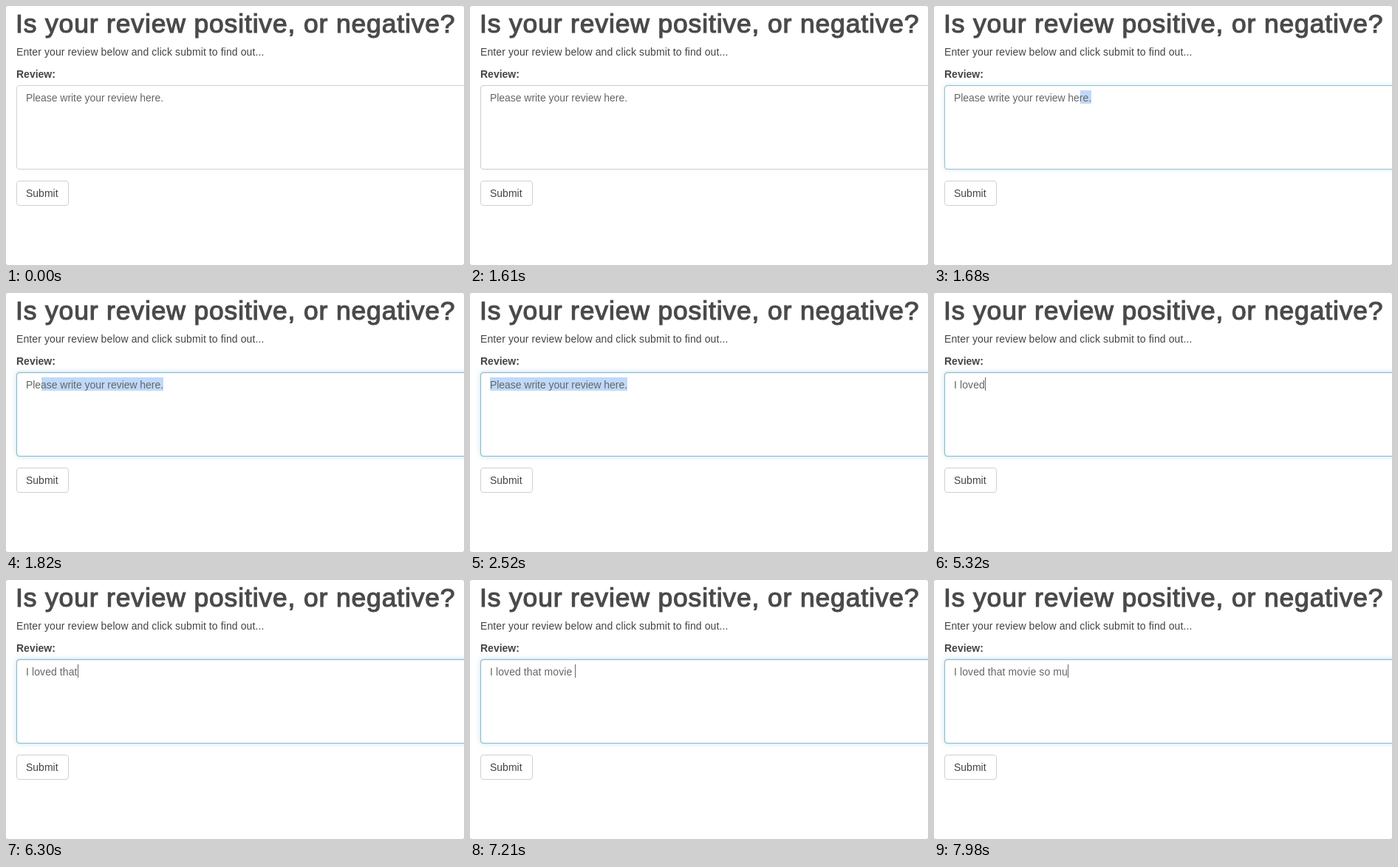
Write an HTML page that moves like this. It is 620x350 px and loops after 8000 ms.

```html
<!DOCTYPE html>
<html lang="en">
<head>
<meta charset="utf-8">
<title>Review form</title>
<style>
html, body { margin: 0; width: 100%; height: 100%; overflow: hidden; background: #a8a8a8; }
#stage {
  position: relative; width: 620px; height: 350px; overflow: hidden;
  background: #fff; border-radius: 2px;
  font: 14px/20px "Liberation Sans", Arial, sans-serif; color: #444;
}
#stage > * { position: absolute; box-sizing: border-box; margin: 0; white-space: pre; }
h1 {
  left: 13px; top: 4px; font-size: 35.5px; line-height: 40px; font-weight: 400;
  letter-spacing: .84px; color: #4a4a4a; -webkit-text-stroke: 1.2px #4a4a4a;
}
.intro { left: 14px; top: 52px; letter-spacing: .1px; }
.label { left: 14px; top: 82px; font-weight: 700; }
.box { left: 14px; top: 107px; width: 640px; height: 114px; border: 1px solid #d2d2d2; border-radius: 4px; }
#focus {
  border-color: #87b9d0;
  box-shadow: inset 0 1px 1px rgba(0, 0, 0, .05), 0 0 6px rgba(110, 185, 225, .45);
}
#mark { top: 114px; height: 18px; background: #bfd9f9; }
.line { left: 27px; top: 114px; color: #666; }
#hint { letter-spacing: -.05px; }
#typed { letter-spacing: .09px; }
#typed.caret::after {
  content: ""; position: absolute; top: 0; width: 1px; height: 18px; background: #666;
}
.button {
  left: 14px; top: 236px; width: 71px; height: 34px; padding: 6px 12px;
  border: 1px solid #d0d0d0; border-radius: 4px; color: #444;
}
</style>
</head>
<body>
<div id="stage">
  <h1>Is your review positive, or negative?</h1>
  <div class="intro">Enter your review below and click submit to find out...</div>
  <div class="label">Review:</div>
  <div class="box"></div>
  <div class="box" id="focus"></div>
  <div id="mark"></div>
  <div class="line" id="hint">Please write your review here.</div>
  <div class="line" id="typed"></div>
  <div class="button">Submit</div>
</div>
<script>
const LOOP = 8000, STEP = 70, TYPE_START = 3710, HINT_END = 213;
const REVIEW = "I loved that movie so mu";
const PAUSES = { 1: 280, 2: 770, 8: 210, 9: 280, 19: 210 };
// Time and left edge of the selection as it is dragged leftwards
const DRAG = [[1680, 198], [1750, 106], [1820, 48], [2170, 39], [2520, 27]];

const $ = id => document.getElementById(id);
const focusBox = $("focus"), mark = $("mark"), hint = $("hint"), typed = $("typed");

let clock = TYPE_START;
const keyTimes = [...REVIEW].map((_, i) => i ? (clock += PAUSES[i] || 2 * STEP) : clock);

function focusLevel(t) {
  const p = Math.min(1, Math.max(0, (Math.floor(t / STEP) * STEP - 1580) / 150));
  return p * p * (3 - 2 * p);
}

function draw(t) {
  const typing = t >= TYPE_START;
  focusBox.style.opacity = focusLevel(t);

  const drag = DRAG.filter(d => t >= d[0]).pop();
  const left = drag && !typing ? drag[1] : HINT_END;
  mark.style.left = left + "px";
  mark.style.width = HINT_END - left + "px";

  hint.style.visibility = typing ? "hidden" : "visible";
  const text = REVIEW.slice(0, keyTimes.filter(k => t >= k).length);
  if (typed.textContent !== text) typed.textContent = text;
  const blinkOff = t >= 4550 && t < 4760;
  typed.classList.toggle("caret", typing && !blinkOff);
}

const start = performance.now();
function tick() {
  draw((performance.now() - start) % LOOP);
  requestAnimationFrame(tick);
}
draw(0);
requestAnimationFrame(tick);
</script>
</body>
</html>
```
